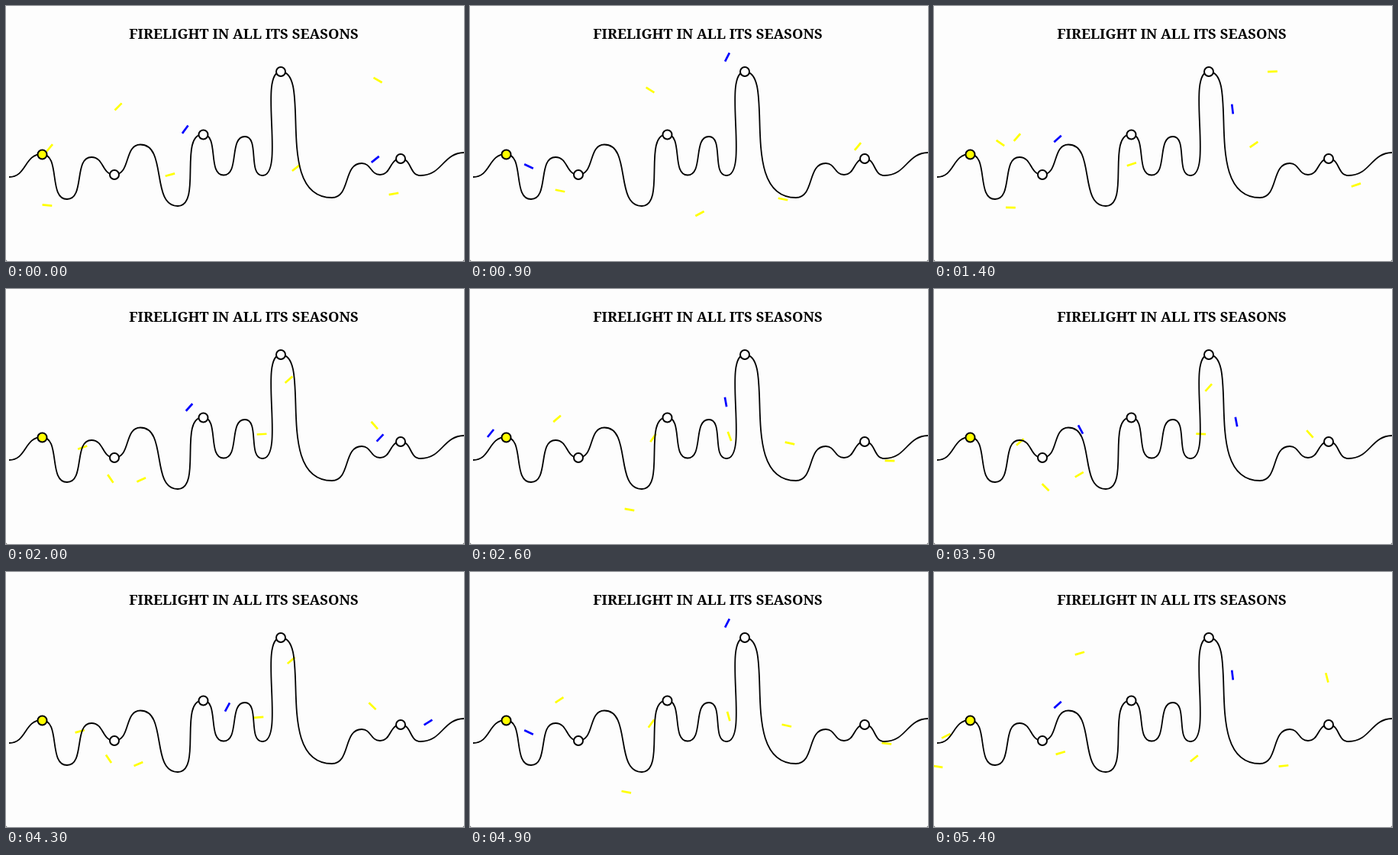
These frames come from a looping animation (600 px wide and 334 px high, 5500 ms). An HTML page:

```html
<!DOCTYPE html>
<html lang="en">
<head>
<meta charset="utf-8">
<title>Firelight</title>
<style>
  html, body { margin: 0; width: 100%; height: 100%; overflow: hidden; background: #333; }
  svg { display: block; width: 600px; height: 334px; background: #fdfdfd; border-radius: 0 0 2px 2px; }
  text { font: bold 18.4px "Noto Serif", serif; text-anchor: middle; }
  path { fill: none; stroke-width: 2.7; }
  #wave { stroke: #000; stroke-width: 1.8; }
  circle { fill: #fff; stroke: #000; stroke-width: 2; }
  circle.on { fill: #ff0; }
</style>
</head>
<body>
<svg viewBox="0 0 600 334">
  <text x="311.5" y="43">FIRELIGHT IN ALL ITS SEASONS</text>
  <path id="yellow" stroke="#ff0"/>
  <path id="blue" stroke="#00f"/>
  <path id="wave"/>
  <circle class="on" cx="47.5" cy="194.5" r="6"/>
  <circle cx="142" cy="221" r="6"/>
  <circle cx="258.5" cy="168.5" r="6"/>
  <circle cx="360" cy="86" r="6"/>
  <circle cx="517" cy="200" r="6"/>
</svg>
<script>
const setPath = (id, d) => document.getElementById(id).setAttribute('d', d);
const mod = (a, n) => ((a % n) + n) % n;

// Crests and troughs, optionally with a leftward pull on the curve leading in
const turns = [
  [4, 224], [47, 194], [80, 253], [112, 198], [142, 221], [176, 181.5],
  [225, 262], [258, 168], [285, 221.5], [313, 171], [336, 222], [360, 86],
  [427, 251, 18], [466, 206], [490, 221], [517, 200], [543, 222], [601, 192]
];

// Every turn is level; the steeper a flank, the longer its handles
setPath('wave', turns.map(([x, y, pull = 0], i) => {
  if (!i) return `M${x} ${y}`;
  const [px, py] = turns[i - 1], dx = x - px;
  const reach = dx * Math.min(1.25, 0.4 + 0.2 * Math.abs(y - py) / dx);
  return `C${px + reach - pull} ${py} ${x - reach - pull} ${y} ${x} ${y}`;
}).join(''));

// A hidden track through knots (x, y, heading in degrees). Dashes sit one cycle apart;
// `marks` are the points of the cycle at which the knots lie, `gap` the cycle in pixels.
function track(gap, marks, first, knots) {
  return knots.map(([x, y, deg], i) => {
    const k = i + first, a = deg * Math.PI / 180;
    return {
      s: marks[mod(k, marks.length)] + Math.floor(k / marks.length),
      x, y, dx: gap * Math.cos(a), dy: gap * Math.sin(a)
    };
  });
}

const yellowTrack = knots => track(405, [0.046, 0.387, 0.597, 0.822], -1, knots);
const yellow = [
  yellowTrack([
    [-28, 238, -35], [57, 186, -51], [138, 250, 55], [209, 289, 10], [301, 272, -28],
    [380, 212, -38], [484, 180, 50], [550, 225, 2], [650, 205, -15]
  ]),
  yellowTrack([
    [-42, 248, 8], [54, 261, 5], [179, 249, -25], [240, 195, -55], [236, 110, -147],
    [147, 132, 135], [102, 207, -20], [114, 170, 140], [118, 242, 12],
    [215, 221, -15], [337, 190, -3], [419, 202, 12], [508, 184, -50],
    [487, 97, -150], [369, 120, 138], [340, 193, 70], [410, 253, 12],
    [508, 246, -10], [630, 205, -20]
  ])
];
const blue = [
  track(500, [0, 0.15, 0.3, 0.45, 0.7, 0.75], 1, [
    [-22, 218, -20], [27, 189, -52], [77, 210, 25], [162, 174, -48], [192, 184, 62],
    [240, 155, -50], [290, 177, -63], [335, 148, -100], [337, 67, -64], [391, 135, 83],
    [396, 174, 80], [490, 195, -48], [553, 197, -32], [620, 160, -30]
  ])
];

// Cubic Hermite point
function pointAt(knots, s) {
  const i = Math.max(1, knots.findIndex(k => k.s > s));
  const a = knots[i - 1], b = knots[i], h = b.s - a.s, u = (s - a.s) / h;
  const w = u * u * (3 - 2 * u), ta = h * u * (1 - u) ** 2, tb = -h * u * u * (1 - u);
  return [
    a.x + (b.x - a.x) * w + a.dx * ta + b.dx * tb,
    a.y + (b.y - a.y) * w + a.dy * ta + b.dy * tb
  ];
}

function dash(knots, s, half = 6.4) {
  const [x, y] = pointAt(knots, s), [nx, ny] = pointAt(knots, s + 0.002);
  const a = Math.atan2(ny - y, nx - x), dx = half * Math.cos(a), dy = half * Math.sin(a);
  return `M${x - dx} ${y - dy}L${x + dx} ${y + dy}`;
}

function dashes(tracks, cycles) {
  let d = '';
  for (const knots of tracks) {
    const start = knots[0].s, end = knots[knots.length - 1].s - 0.01;
    for (let s = start + mod(cycles - start, 1); s < end; s++) d += dash(knots, s);
  }
  return d;
}

// Ten poses a second; the opening pose lies slightly early and is held for two
function draw(ms) {
  const step = Math.floor(ms % 5500 / 100);
  const clock = step < 2 ? -0.35 : step;
  setPath('yellow', dashes(yellow, -clock / 7.64));
  setPath('blue', dashes(blue, clock / 20));
}

const begin = performance.now();
(function loop() {
  draw(performance.now() - begin);
  requestAnimationFrame(loop);
})();
</script>
</body>
</html>
```
